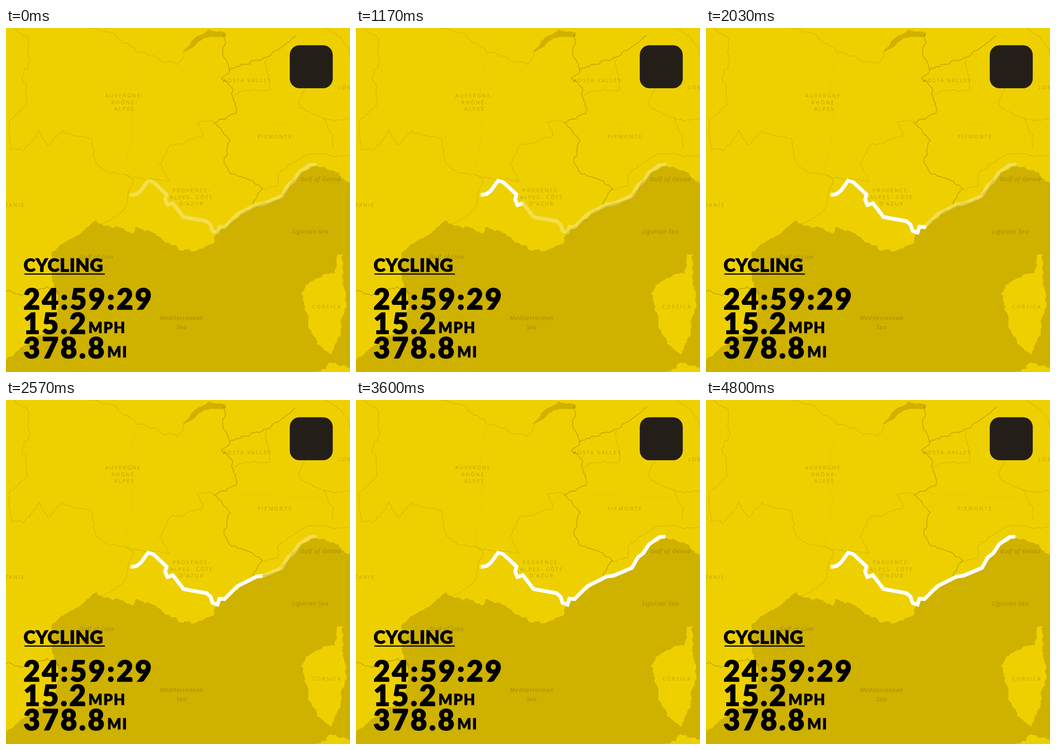
An HTML page that plays this animation: 748 px wide and 748 px high, repeating every 4.91 s.

```html
<!DOCTYPE html>
<html lang="en">
<head>
<meta charset="utf-8">
<title>Cycling route</title>
<style>
  html, body { margin: 0; width: 100%; height: 100%; overflow: hidden; background: #eed000; }
  svg { display: block; width: 100vw; height: 100vh; }
  .sea { fill: #cfb100; }
  .land { fill: #eed000; }
  .border, .frontier, .river { fill: none; stroke: #000; stroke-linejoin: round; }
  .border { stroke-width: 1.2; stroke-opacity: .12; }
  .frontier { stroke-width: 2; stroke-opacity: .17; }
  .river { stroke-width: 1; stroke-opacity: .045; }
  .label { font: 11px "Open Sans", sans-serif; letter-spacing: 2.7px; fill-opacity: .22; text-anchor: middle; }
  .water { font: italic 12.5px "Open Sans", sans-serif; letter-spacing: 1px; fill-opacity: .23; text-anchor: middle; }
  .route { fill: none; stroke: #fff; stroke-width: 8; }
  .stats { font-family: Lato, sans-serif; font-weight: 900; stroke: #000; }
  .title { font-size: 40px; letter-spacing: .4px; stroke-width: .8px; }
  .value { font-size: 62px; letter-spacing: 4.3px; stroke-width: 1.6px; }
  .unit { font-size: 32px; letter-spacing: 2px; stroke-width: .8px; }
</style>
</head>
<body>
<svg viewBox="0 0 748 748">
  <g id="map"></g>
  <g id="labels"></g>
  <path id="faint" class="route" stroke-opacity=".3" stroke-linejoin="round" stroke-linecap="round"/>
  <path id="trace" class="route"/>
  <rect x="617" y="37.500" width="93.500" height="93.500" rx="21" fill="#231f18"/>
  <g class="stats">
    <text class="title" x="38" y="530">CYCLING</text>
    <path d="M40 535H215" stroke-width="2.400"/>
    <text class="value" x="38" y="612">24:59:29</text>
    <text class="value" x="38" y="665">15.2</text>
    <text class="unit" x="179" y="663">MPH</text>
    <text class="value" x="38" y="718">378.8</text>
    <text class="unit" x="220" y="716">MI</text>
  </g>
</svg>
<script>
const LOOP = 4910, START = 400, DRAW = 3000;
const $ = id => document.getElementById(id);

let seed = 7;
const rand = () => (seed = seed * 16807 % 2147483647) / 2147483647 - .5;

function add(parent, tag, attrs, text = '') {
  const el = document.createElementNS('http://www.w3.org/2000/svg', tag);
  for (const k in attrs) el.setAttribute(k, attrs[k]);
  el.textContent = text;
  $(parent).append(el);
}

// Splits a segment at displaced midpoints until the pieces are short.
function crumble(a, b, amount) {
  const dx = b[0] - a[0], dy = b[1] - a[1], len = Math.hypot(dx, dy);
  if (len < 7) return [b];
  const k = rand() * Math.min(amount, 6 / len);
  const mid = [(a[0] + b[0]) / 2 - dy * k, (a[1] + b[1]) / 2 + dx * k];
  return [...crumble(a, mid, amount), ...crumble(mid, b, amount)];
}

function shape(cls, text, amount, tail = '') {
  const keys = text.split(' ').map(p => p.split(',').map(Number));
  const pts = keys.flatMap((p, i) => i ? crumble(keys[i - 1], p, amount) : [p]);
  add('map', 'path', { class: cls, d: 'M' + pts.map(p => p.map(v => v.toFixed(1))).join('L') + tail });
}
const border = text => shape('border', text, .6);
const frontier = text => shape('frontier', text, .5);
const river = text => shape('river', text, .3);

shape('sea', '0,722 66,672 106,650 114,600 104,560 95,520 103,485 150,453 197,418 212,430 247,434 275,447 280,434 325,447 345,465 372,475 375,482 402,486 452,468 457,445 485,424 510,402 556,382 600,366 616,340 640,314 672,298 725,316 748,338', .45, 'V748H0Z');
shape('land', '720,492 732,491 731,545 740,600 727,655 707,710 676,687 660,655 650,615 641,578 652,558 690,536 715,534 718,510', .5, 'Z');
shape('land', '670,748 697,740 705,727 728,735 748,738', .5, 'V748Z');
shape('sea', '384,54 410,22 440,3 478,10 478,18 430,22 410,40', .2, 'Z');

border('18,0 50,25 52,70 36,105 45,160 8,205 10,265 38,267 72,222 90,255 122,223 182,240 196,295 225,316 258,318');
border('258,318 275,328 256,396 207,426');
border('258,318 310,328 355,333 333,297 358,254 428,235 415,206 452,203');
border('180,0 238,12 284,52 372,80 386,55');
border('494,145 575,132 565,65');
border('558,350 590,345 594,315 635,285 665,275 748,278');
border('650,131 636,165 690,195 712,238 708,262');
border('690,195 748,200');
border('690,0 725,18 748,60');
frontier('474,14 472,60 486,92 468,110 490,128 500,186 452,206 488,245 474,288 490,318 540,338 558,350 538,384');
frontier('486,92 530,78 590,48 632,16');
frontier('0,573 45,580 90,562 116,578');
river('284,52 270,110 275,220 258,312');
river('462,200 555,205 690,215');

const label = (cls, lines, x, y, gap) => lines.split('/').forEach((line, i) =>
  add('labels', 'text', { class: cls, x, y: y + i * gap }, line));
const region = (lines, x, y) => label('label', lines, x + 1, y, 14.7);
const water = (lines, x, y) => label('water', lines, x, y, 19.5);

region('AUVERGNE-/RHÔNE-/ALPES', 257, 151);
region('PROVENCE-/ALPES- CÔTE/D\'AZUR', 403, 357);
region('AOSTA VALLEY', 524, 118);
region('PIEMONTE', 584, 240);
region('CORSICA', 697, 610);
region('LOMBARDY', 762, 133);
region('OCCITANIE', 1, 389);
water('Gulf of Genoa', 684, 333);
water('Ligurian Sea', 662, 447);
water('Gulf of Lion', 197, 502);
water('Mediterranean/Sea', 382, 635);

const route = 'M272,363 284,361 293,354 309,332 320,335 349,362 346,373 351,385 363,381 386,411 436,420 445,428 449,441 460,445 464,432 475,433 503,405 545,384 560,382 600,365 613,342 625,333 637,314 660,298 672,297';
const trace = $('trace');
$('faint').setAttribute('d', route);
trace.setAttribute('d', route);
const length = trace.getTotalLength();

function draw() {
  // The line advances thirty times a second.
  const t = Math.floor(performance.now() % LOOP * .03 + .3) / .03;
  const p = Math.min(1, Math.max(0, (t - START) / DRAW));
  trace.style.display = p ? '' : 'none';
  trace.setAttribute('stroke-dasharray', p < 1 ? `${length * p} ${length * 2}` : 'none');
  requestAnimationFrame(draw);
}
draw();
</script>
</body>
</html>
```
